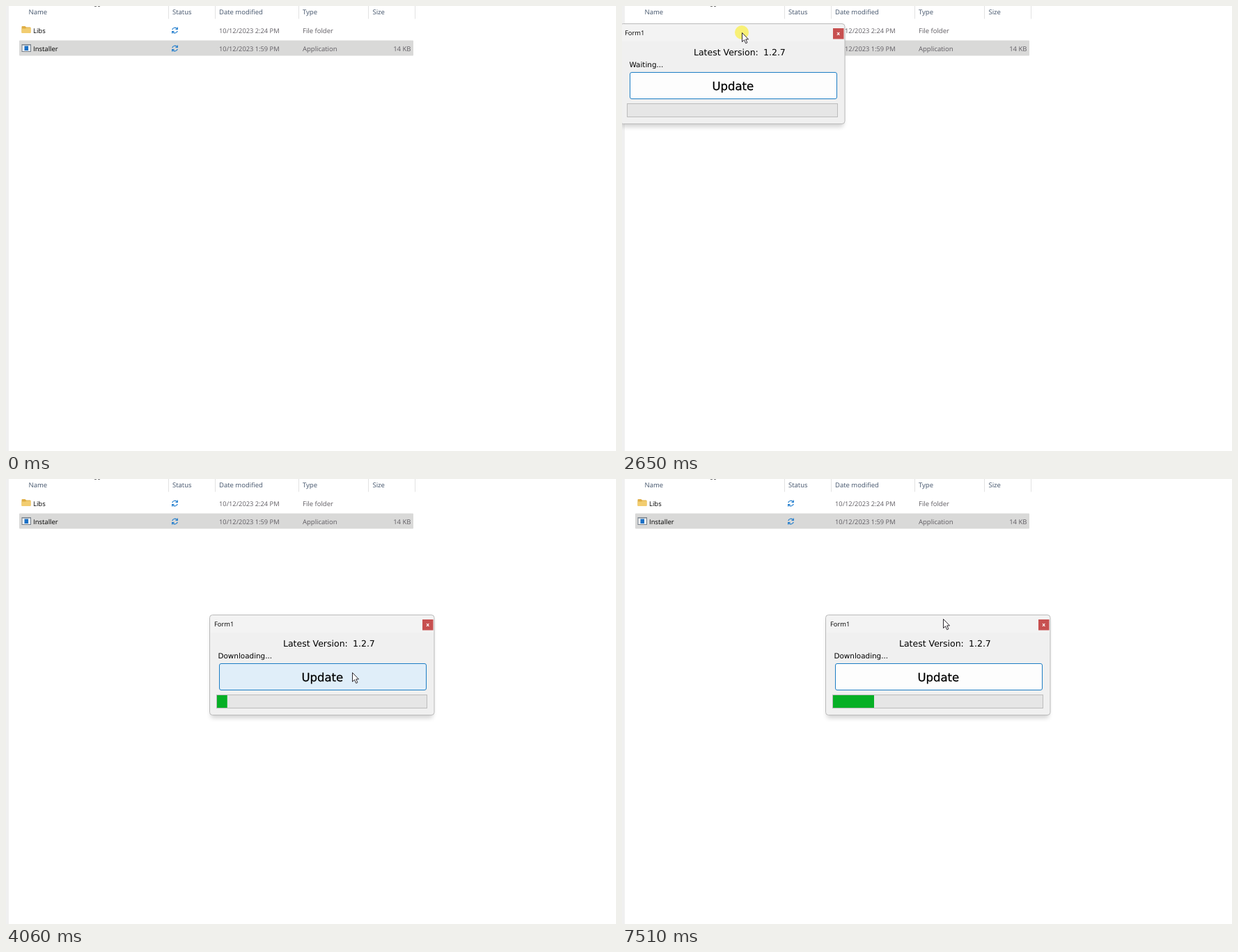
An HTML page that plays this animation: 876x640 px, repeating every 8000 ms.

```html
<!DOCTYPE html>
<html lang="en">
<head>
<meta charset="utf-8">
<title>Installer update</title>
<style>
html, body { margin: 0; width: 100%; height: 100%; overflow: hidden; background: #fff; }
svg { display: block; width: 100vw; height: 100vh; }
text { font: 9.5px "Open Sans", "Noto Sans", sans-serif; text-rendering: geometricPrecision; white-space: pre; }
.head text { fill: #43546b; }
.dim { fill: #5f5c62; }
text.date { font-size: 9.3px; }
.form text { font-family: "DejaVu Sans", sans-serif; font-size: 10.4px; fill: #000; }
.form text.title { font-family: "Open Sans", "Noto Sans", sans-serif; font-size: 9.4px; }
.form text.version { font-size: 12.5px; }
.form text.big { font-size: 16.5px; stroke: #000; stroke-width: .25px; }
.form text.x { font-size: 7.5px; font-weight: bold; fill: #fff; }

/* 1% of the loop is 80 ms */
.row, .win, .form, .blank, .ready, .face, .waiting, .loading, .fill, .glow, .cursor, .spot {
  animation: 8s step-end infinite;
}
.row { animation-name: row; }
@keyframes row { 0%, 19.5% { fill: #d9d9d8 } 9.375% { fill: #cce8ff } }

.win { animation-name: show-win; }
@keyframes show-win { 0% { opacity: 0 } 19.4% { opacity: 1 } }

.form { animation-name: drag; }
@keyframes drag {
  0% { transform: translate(-33px, 15px) }
  31.4% { transform: translate(-33px, 15px); animation-timing-function: steps(2) }
  33.1% { transform: translate(-3px, 25px); animation-timing-function: steps(6) }
  38.25%, 100% { transform: translate(292px, 195px) }
}

.blank { animation-name: blank; }
@keyframes blank { 0% { opacity: 1 } 21.2% { opacity: 0 } }
.ready { animation-name: ready; }
@keyframes ready { 0% { opacity: 0 } 21.2% { opacity: 1 } }

.face { animation-name: face; }
@keyframes face {
  0%, 59% { fill: #fdfdfd }
  40.8%, 45.1% { fill: #e0eef9 }
  44.2% { fill: #cce4f7 }
}

.waiting { animation-name: waiting; }
@keyframes waiting { 0% { opacity: 1 } 46% { opacity: 0 } }
.loading { animation-name: loading; }
@keyframes loading { 0% { opacity: 0 } 46% { opacity: 1 } }

.fill { animation-name: fill; }
@keyframes fill {
  0% { transform: scaleX(0) }
  48.7% { transform: scaleX(0); animation-timing-function: steps(8) }
  55.7%, 100% { transform: scaleX(1) }
}

.glow { animation-name: glow; }
@keyframes glow {
  0% { transform: translateX(-62px) }
  63.1% { transform: translateX(-62px); animation-timing-function: steps(9) }
  70.95% { transform: translateX(62px) }
  71% { transform: translateX(-62px) }
  85.1% { transform: translateX(-62px); animation-timing-function: steps(10) }
  93.85%, 100% { transform: translateX(62px) }
}

.cursor { animation-name: cursor; }
@keyframes cursor {
  0% { opacity: 0; transform: translate(820px, 612px) }
  1.75% { opacity: 1; transform: translate(820px, 612px); animation-timing-function: steps(4) }
  5.1% { transform: translate(470px, 300px); animation-timing-function: steps(4) }
  8.5% { transform: translate(125px, 53px) }
  17% { transform: translate(125px, 53px); animation-timing-function: steps(4) }
  20.3% { transform: translate(148px, 31px) }
  22% { transform: translate(148px, 31px); animation-timing-function: steps(4) }
  26.25% { transform: translate(142px, 28px) }
  31.4% { transform: translate(142px, 28px); animation-timing-function: steps(2) }
  33.1% { transform: translate(172px, 38px); animation-timing-function: steps(6) }
  38.25% { transform: translate(467px, 208px) }
  39.1% { transform: translate(467px, 208px); animation-timing-function: steps(3) }
  41.6% { transform: translate(497px, 278px) }
  57.35% { transform: translate(497px, 278px); animation-timing-function: steps(3) }
  59.95% { transform: translate(473px, 239px); animation-timing-function: steps(2) }
  61.7%, 100% { opacity: 1; transform: translate(461px, 201px) }
}

.spot { animation-name: spot; }
@keyframes spot {
  0%, 11.1%, 12.85%, 38.25%, 45.1% { opacity: 0 }
  10.2%, 12%, 30.5%, 44.2% { opacity: 1 }
}
</style>
</head>
<body>
<svg viewBox="0 0 876 640" preserveAspectRatio="none">
  <defs>
    <linearGradient id="shine">
      <stop offset="0" stop-color="#fff" stop-opacity="0"/>
      <stop offset=".5" stop-color="#fff" stop-opacity=".5"/>
      <stop offset="1" stop-color="#fff" stop-opacity="0"/>
    </linearGradient>
    <clipPath id="done"><rect width="59" height="18"/></clipPath>
    <filter id="soft" x="-10%" y="-10%" width="120%" height="125%"><feGaussianBlur stdDeviation="3"/></filter>
    <g id="sync" fill="none" stroke="#1a79cc" stroke-width="1.2">
      <path d="M-3.7-.8A3.8 3.8 0 0 1 3.2-2.1M3.7.8A3.8 3.8 0 0 1-3.2 2.1"/>
      <path d="M3.8-4.4V-1.5H.9M-3.8 4.4V1.5H-.9"/>
    </g>
  </defs>

  <rect width="876" height="640" fill="#fff"/>
  <rect width="4" height="640" fill="#f0f0f0"/>
  <path d="M127 .5h3M132 .5h3" stroke="#777"/>
  <path d="M233.5 0V18.5M300.5 0V18.5M420.5 0V18.5M520.5 0V18.5M587.5 0V18.5" stroke="#e2e2e2"/>
  <g class="head">
    <text x="32.5" y="12">Name</text>
    <text x="239" y="12">Status</text>
    <text x="306" y="12">Date modified</text>
    <text x="426" y="12">Type</text>
    <text x="526.5" y="12">Size</text>
  </g>

  <rect class="row" x="19" y="49.5" width="566" height="22" rx="1"/>
  <path d="M22.5 30q0-1 1-1h4l1.5 1.5h5.5q1 0 1 1V38q0 1-1 1h-11q-1 0-1-1z" fill="#dfae45"/>
  <path d="M22.5 32.5h5.5l1.5-1h6V38q0 1-1 1h-11q-1 0-1-1z" fill="#f2cd70"/>
  <rect x="23" y="55.5" width="12.5" height="10" fill="#eef1f4" stroke="#77808a"/>
  <path d="M23 56h12.5" stroke="#77808a"/>
  <rect x="26.5" y="57.5" width="5.5" height="6.5" fill="#1a70c6"/>
  <use href="#sync" x="242.5" y="35"/>
  <use href="#sync" x="242.5" y="61"/>
  <text x="39" y="38.5">Libs</text>
  <text x="39" y="64.5">Installer</text>
  <g class="dim">
    <text class="date" x="306" y="38.5">10/12/2023 2:24 PM</text>
    <text class="date" x="306" y="64.5">10/12/2023 1:59 PM</text>
    <text x="426" y="38.5">File folder</text>
    <text x="426" y="64.5">Application</text>
    <text x="581.5" y="64.5" text-anchor="end">14 KB</text>
  </g>

  <g class="win"><g class="form">
    <rect x="2" y="6" width="319" height="143" rx="4" opacity=".17" filter="url(#soft)"/>
    <rect x=".5" y=".5" width="322.5" height="144" rx="4" fill="#f0f0f0"/>
    <path d="M.5 26V4.5q0-4 4-4h314.500q4 0 4 4V26z" fill="#f3f3f3"/>
    <rect x=".5" y=".5" width="322.5" height="144" rx="4" fill="none" stroke="#bababa"/>
    <text class="title" x="7" y="17">Form1</text>
    <rect x="306" y="7" width="15.5" height="15.5" fill="#c75050"/>
    <text class="x" x="313.7" y="17" text-anchor="middle">x</text>

    <g class="blank" fill="#fff">
      <rect x="104" y="33" width="114" height="15.5"/>
      <rect x="10" y="52.5" width="81" height="11.5"/>
      <rect x="10" y="69" width="302.5" height="40.5"/>
      <rect x="10" y="115" width="302.5" height="19.5"/>
    </g>

    <g class="ready">
      <text class="version" x="106" y="46">Latest Version:</text>
      <text class="version" x="206" y="46">1.2.7</text>
      <text class="waiting" x="13.5" y="63">Waiting...</text>
      <text class="loading" x="12.5" y="63">Downloading...</text>
      <rect class="face" x="14.5" y="70.5" width="297" height="38" rx="2.5" stroke="#1c7dc4"/>
      <text class="big" x="162.3" y="96" text-anchor="middle">Update</text>
      <rect x="10.5" y="115.5" width="302" height="19" fill="#e6e6e6" stroke="#bcbcbc"/>
      <g transform="translate(11 116)" clip-path="url(#done)">
        <rect class="fill" width="59" height="18" fill="#06b025"/>
        <rect class="glow" width="59" height="18" fill="url(#shine)"/>
      </g>
    </g>
  </g></g>

  <g class="cursor">
    <circle class="spot" r="10" fill="#f8f076"/>
    <path d="M.5.5V13.5L3.5 10.7L5.7 15.7L7.9 14.7L5.7 9.900H9.5Z" fill="#fff" stroke="#2e2a30"/>
  </g>
</svg>
</body>
</html>
```
